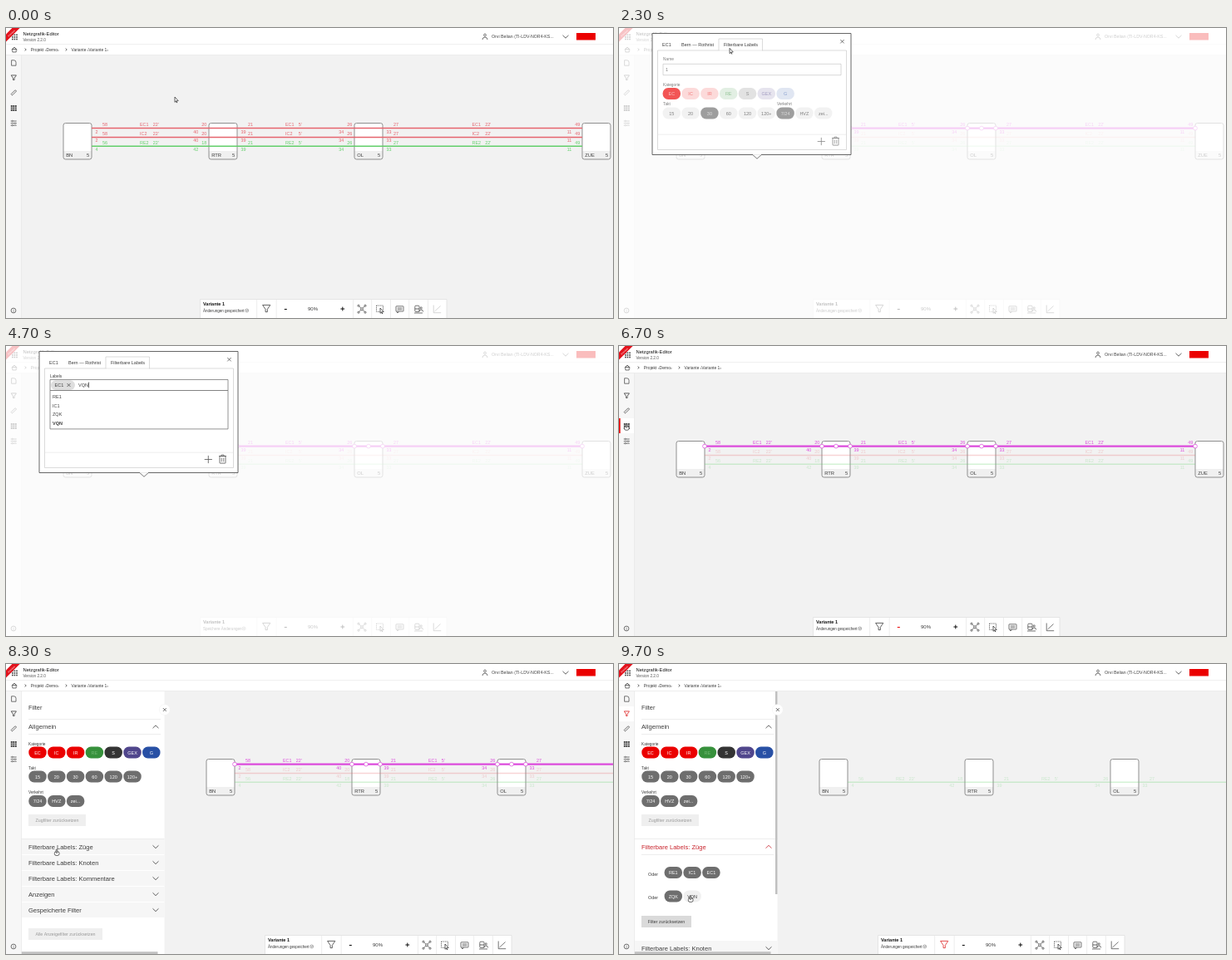
Animation, 730 px wide and 349 px high, one loop 9800 ms. Source, as an HTML page with a canvas:

```html
<!DOCTYPE html>
<html lang="de">
<head>
<meta charset="utf-8">
<title>Netzgrafik-Editor</title>
<style>
html, body { margin: 0; width: 100%; height: 100%; overflow: hidden; background: #f2f2f2; }
canvas { display: block; width: 730px; height: 349px; }
</style>
</head>
<body>
<canvas id="stage"></canvas>
<script>
const W = 730, H = 349, LOOP = 9800, STEP = 100;
const FONT = '"Liberation Sans", Arial, sans-serif';
const INK = '#3c3c3c', RED = '#eb0000', HOT = '#c8232c', PINK = '#dc4bdc', GRAY = '#6e6e6e', RULE = '#e2e2e2';
const cv = document.getElementById('stage');
const g = cv.getContext('2d');
const dpr = window.devicePixelRatio || 1;
cv.width = W * dpr;
cv.height = H * dpr;

const ramp = (t, a, b) => Math.min(1, Math.max(0, (t - a) / (b - a)));
const ease = p => p * p * (3 - 2 * p);
const within = (t, a, b) => t >= a && t < b;

// Moments of the story
const PICK = 900, OPEN = 1200, TAB = 2200, LIST = 3000, CHIP = 3600, TYPE = 4100,
  ENTER = 5000, CLOSE = 6250, PANEL = 7200, EXPAND = 8400, FILTER = 9500;

function text(s, x, y, size, color = INK, align = 'left', weight = '') {
  g.font = `${weight} ${size}px ${FONT}`;
  g.textAlign = align;
  g.fillStyle = color;
  g.fillText(s, x, y);
}
function rect(x, y, w, h, color) {
  g.fillStyle = color;
  g.fillRect(x, y, w, h);
}
function ink(fill, stroke, lw) {
  if (fill) { g.fillStyle = fill; g.fill(); }
  if (stroke) { g.strokeStyle = stroke; g.lineWidth = lw; g.stroke(); }
}
function box(x, y, w, h, r, fill, stroke, lw = 0.7) {
  g.beginPath();
  g.roundRect(x, y, w, h, r);
  ink(fill, stroke, lw);
}
function path(pts, color = INK, lw = 0.7, fill) {
  g.beginPath();
  pts.forEach(([x, y]) => g.lineTo(x, y));
  ink(fill, color, lw);
}
function line(x, y, dx, dy, color, lw) {
  path([[x, y], [x + dx, y + dy]], color, lw);
}
function ring(x, y, r, color = INK, lw = 0.7, fill) {
  g.beginPath();
  g.arc(x, y, r, 0, 7);
  ink(fill, color, lw);
}
function layer(alpha, draw, dx = 0, dy = 0, turn = 0) {
  if (alpha <= 0) return;
  g.save();
  g.globalAlpha *= alpha;
  g.translate(dx, dy);
  g.rotate(turn);
  draw();
  g.restore();
}

// Icons

function cross(x, y, r, color = INK) {
  line(x - r, y - r, 2 * r, 2 * r, color);
  line(x - r, y + r, 2 * r, -2 * r, color);
}
function plus(x, y, r, color = INK, lw = 0.8) {
  line(x - r, y, 2 * r, 0, color, lw);
  line(x, y - r, 0, 2 * r, color, lw);
}
function wedge(x, y, w, h, color = INK, fill) {
  path([[x - w, y - h / 2], [x, y + h / 2], [x + w, y - h / 2]], color, 0.8, fill);
}
const chevron = (x, y, up, color) => wedge(x, y, 3.5, up ? -3.4 : 3.4, color);
function funnel(x, y, s, color = INK) {
  const half = [[1, -1], [0.25, 0.1], [0.25, 0.8]];
  const mirror = half.map(([a, b]) => [-a, b]).reverse();
  path([...half, ...mirror, half[0]].map(([a, b]) => [x + a * s, y + b * s]), color, 0.8);
}
function dots(x, y, gap, size) {
  for (let i = 0; i < 9; i++) rect(x + i % 3 * gap, y + Math.floor(i / 3) * gap, size, size, INK);
}
function person(x, y, s) {
  ring(x, y - s, s * 0.7);
  g.beginPath();
  g.arc(x, y + s * 1.8, s * 1.5, Math.PI, 0);
  ink(null, INK, 0.7);
}
function arrow(x, y, s) {
  path([[0, 0], [0, 6.3], [1.7, 4.9], [4.2, 4.6], [0, 0]].map(([a, b]) => [x + a * s, y + b * s]), '#222', 0.7, '#fff');
  line(x + 1.7 * s, y + 4.9 * s, s, 2.2 * s, '#222', 1);
}
function hand(x, y) {
  box(x - 2.6, y + 2.8, 5.6, 4.6, 1.8, '#fff', '#222');
  box(x - 0.8, y, 1.6, 4.5, 0.8, '#fff', '#222');
}
function trash(x, y, color) {
  box(x - 3.5, y - 4, 7, 8.6, 0.5, null, color, 0.8);
  box(x - 1.5, y - 5.5, 3, 1.5, 0, null, color);
  line(x - 4.5, y - 4, 9, 0, color, 0.8);
  for (const d of [-1.2, 1.2]) line(x + d, y - 2, 0, 4.8, color);
}

// Controls

function pill(label, x, y, fill, color = '#fff') {
  box(x - 10.7, y - 7, 21.4, 14, 6.5, fill);
  text(label, x, y + 2, 5.5, color, 'center');
}
function pills(labels, x, y, style = () => [GRAY]) {
  labels.forEach((s, i) => pill(s, x + i * 22.8, y, ...style(s, i)));
}
function button(label, w, y, fill, color) {
  rect(27, y, w, 14, fill);
  text(label, 27 + w / 2, y + 9, 5.3, color, 'center');
}

// Network graph

const NODE = 34;
const nodes = [['BN', 69], ['RTR', 244], ['OL', 419], ['ZUE', 693]];
const legs = [[58, 22], [21, 5], [27, 22]];
const trains = ['EC1', 'IC2', 'RE2'];
const minute = n => n % 60;

function drawTrain(name, row, picked) {
  const y = 120.6 + row * 10.8, regional = name === 'RE2';
  const color = picked ? PINK : regional ? '#62cf6a' : '#e5646e';
  const label = (s, x, dy, align) => text(s, x, y + dy, 5.4, color, align);
  line(nodes[0][1] + NODE, y, 590, 0, color, picked ? 2.2 : 1.5);
  legs.forEach(([leave, time], i) => {
    const a = nodes[i][1] + NODE, b = nodes[i + 1][1], mid = (a + b) / 2;
    const dep = leave - (regional && !i ? 2 : 0), arr = minute(dep + time);
    label(dep, a + 13, -2.4);
    label(60 - dep, a + 4.5, 6);
    label(name, mid - 12.5, -2.4);
    label(time + "'", mid + 3.2, -2.4);
    label(arr, b - 2.8, -2.4, 'right');
    label(60 - arr, b - 12.7, 6, 'right');
  });
  if (!picked) return;
  nodes.forEach(([, x], i) => {
    const stops = i === 0 ? [NODE] : i === 3 ? [0] : [0, NODE / 2, NODE];
    stops.forEach(d => ring(x + d, y, 2.4, PINK, 0.7, '#fff'));
  });
}

function drawGraph(t) {
  const sel = t >= PICK, left = 1 - ramp(t, FILTER - 100, FILTER + 100);
  for (const [name, x] of nodes) {
    box(x, 114.5, NODE, 43.5, 2.5, '#fff');
    box(x, 148, NODE, 10, [0, 0, 2.5, 2.5], '#f0f0f0');
    box(x, 114.5, NODE, 43.5, 2.5, null, '#858585', 0.9);
    text(name, x + 3.2, 155.2, 5.8);
    text('5', x + 31, 155.2, 5.6, INK, 'right');
  }
  trains.forEach((name, row) => {
    const picked = sel && row === 0;
    const dim = sel && !picked ? 0.28 : 1;
    layer(dim * (row === 2 ? 1 : left), () => drawTrain(name, row, picked));
  });
}

// Application frame

function drawHeader() {
  rect(0, 0, W, 32.5, '#fff');
  rect(0, 19, W, 0.7, '#e8e8e8');
  rect(0, 32, W, 0.6, '#e4e4e4');
  dots(7, 7.5, 2.6, 1.6);
  line(-3, 15, 18, -18, '#e2121c', 6.5);
  layer(1, () => text('Preview', 0, 1, 3, '#fff', 'center'), 6.5, 6.5, -Math.PI / 4);
  text('Netzgrafik-Editor', 20.5, 9.3, 5.8, '#111');
  text('Version 2.2.0', 20.5, 16.3, 4.7, '#555');
  person(576, 10.5, 2);
  text('Orvi Belian (TI-LDV-NOR4-KS...', 584, 12.3, 5.25, '#444');
  chevron(673, 10.5);
  rect(686, 6, 23, 8.5, RED);
  wedge(10, 24.6, 3.3, -3.2);
  box(7.8, 25.5, 4.4, 3.5, 0, null, INK);
  for (const x of [23.5, 72.5]) layer(1, () => wedge(0, 0, 1.5, 1.4), x, 26, -Math.PI / 2);
  text('Projekt ‹Demo›', 29.8, 28, 5.05);
  text('Variante ‹Variante 1›', 78.5, 28, 4.9);
}

function drawSidebar(t) {
  const active = t >= FILTER;
  const over = within(t, 6600, 7000) ? 96 : within(t, 7000, 7600) ? 60 : 0;
  rect(0, 32.5, 18.5, H, '#f7f7f7');
  rect(18, 32.5, 0.6, H, '#e4e4e4');
  if (over || active) rect(0, (over || 60) - 9, 18, 18, '#fff');
  if (over) rect(0, over - 9, 1.6, 18, RED);
  box(6.6, 38.8, 5.4, 6.4, [0, 2.5, 0, 0], null, INK);
  funnel(9.3, 60, 3.1, active || over === 60 ? '#d22' : INK);
  layer(1, () => box(-3.6, -1, 7.2, 2, 0.5, null, INK), 9.3, 77.8, -Math.PI / 4);
  dots(5.8, 93, 2.5, 1.9);
  for (let i = 0; i < 3; i++) {
    line(5.7, 112 + i * 2.6, 7, 0);
    ring(i === 1 ? 11 : 7.7, 112 + i * 2.6, 0.8, INK, 0.5, '#fff');
  }
  ring(9, 340, 2.9);
  text('i', 9, 341.8, 4.8, INK, 'center');
}

function drawToolbar(t) {
  box(233.5, 326.5, 296.5, 30, 0, '#fff', '#ddd');
  rect(301.5, 327, 0.6, 22, RULE);
  rect(324.8, 327, 0.6, 22, RULE);
  for (let i = 0; i < 5; i++) rect(417 + i * 22.5, 327, 0.6, 22, RULE);
  const saving = within(t, CHIP, 6400), cx = saving ? 286 : 289.7;
  text('Variante 1', 237, 333.6, 5.5, '#111', 'left', 'bold');
  text(saving ? 'Speichere Änderungen' : 'Änderungen gespeichert', 237, 341.6, 4.55);
  ring(cx, 340, 2, '#666', 0.5);
  wedge(cx, 340, 0.9, 1.2, '#666');
  funnel(313.2, 338, 4.6, t >= FILTER ? '#d22' : INK);
  line(334.8, 338.5, 3, 0, within(t, 6500, 7000) ? RED : '#111', 1.1);
  text('90%', 369, 340, 6, INK, 'center');
  plus(404.8, 338, 2.4, '#111', 1);
  cross(428, 338.2, 3.9);
  for (const dx of [-4, 4]) for (const dy of [-4, 4]) ring(428 + dx, 338.2 + dy, 1.1, INK, 0.7, '#fff');
  ring(428, 338.2, 1.4, INK, 0.7, '#fff');
  g.setLineDash([1.4, 0.9]);
  box(445.5, 334, 8, 7.5, 0, null, INK);
  g.setLineDash([]);
  arrow(450, 337, 1);
  box(469, 334.8, 9, 6.2, 0.5, null, INK);
  wedge(471, 342, 1.2, 2, INK, '#fff');
  for (const y of [337, 338.9]) line(470.7, y, 5.7, 0);
  box(491.8, 334.2, 5.2, 7.2, 1, null, INK);
  rect(491.8, 337.6, 5.2, 0.8, INK);
  line(491, 343, 10, 0);
  person(499.2, 338.6, 1.6);
  const c = t >= PICK ? INK : '#c4c4c4';
  line(514.2, 333.5, 0, 9.2, c);
  line(514.2, 342.7, 9, 0, c);
  line(515.5, 341, 7, -6.5, c);
}

// Filter panel

const kinds = { EC: RED, IC: RED, IR: RED, RE: '#37913c', S: '#343434', GEX: '#50468c', G: '#2850a5' };
const beats = ['15', '20', '30', '60', '120', '120+'];
const runs = ['7/24', 'HVZ', 'zei...'];
const labels = ['RE1', 'IC1', 'EC1', 'ZQK', 'VQN'];
const more = ['Filterbare Labels: Knoten', 'Filterbare Labels: Kommentare', 'Anzeigen', 'Gespeicherte Filter'];

function sectionRow(label, y, open) {
  const color = open ? HOT : INK;
  rect(18.5, y - 9, 172, 18, open ? '#fff' : '#f6f6f6');
  text(label, 27, y + 2.6, 7.55, color);
  chevron(180, y, open, color);
}

function drawLabelFilter(h, off) {
  g.beginPath();
  g.rect(18, 229, 173, h);
  g.clip();
  rect(27, 229, 159, 0.6, RULE);
  for (const y of [251, 279.5]) text('Oder', 35, y + 3.5, 5.4);
  pills(labels.slice(0, 3), 65.3, 251);
  pills(labels.slice(3), 65.3, 279.5, s => s === 'VQN' && off ? ['#f0f0f0', INK] : [GRAY]);
  button('Filter zurücksetzen', 60, 303, '#dadada', INK);
}

function drawPanel(t) {
  const open = ease(ramp(t, EXPAND - 50, EXPAND + 300)), drop = 103 * open;
  rect(18.5, 32.5, 172, H, '#fff');
  text('Filter', 27, 55, 7.4);
  text('Allgemein', 27, 78.2, 7.6);
  chevron(180, 75.5, true);
  for (const y of [66, 84.2]) rect(27, y, 159, 0.6, RULE);
  ['Kategorie', 'Takt', 'Verkehrt'].forEach((s, i) => text(s, 27, 98 + i * 29.2, 4.8));
  pills(Object.keys(kinds), 38, 106.5, s => [kinds[s], s === 'RE' ? '#73ba75' : '#fff']);
  pills(beats, 38, 135.5);
  pills(runs, 38, 165);
  button('Zugfilter zurücksetzen', 69, 181, '#efefef', '#999');
  rect(18.5, 210, 172, 0.6, RULE);
  sectionRow('Filterbare Labels: Züge', 220, t >= EXPAND);
  layer(open ? 1 : 0, () => drawLabelFilter(drop, t >= FILTER));
  more.forEach((s, i) => sectionRow(s, 239 + i * 19 + drop));
  button('Alle Anzeigefilter zurücksetzen', 89, 318 + drop, '#efefef', '#999');
  rect(18.5, 346.2, 164, 2.8, '#c2c2c2');
  if (open) rect(188, 33, 2.5, 316 - 72 * open, '#c0c0c0');
  ring(190.8, 55, 6.5, '#eee', 0.5, '#fff');
  cross(190.8, 55, 2);
}

// Train dialog

function drawBaseTab() {
  text('Name', 53, 39.3, 4.8);
  box(53, 43.3, 214, 13.4, 0, '#fff', '#aaa');
  text('1', 56, 52, 5.5);
  text('Kategorie', 53, 69.6, 4.8);
  pills(Object.keys(kinds), 63.3, 79, (s, i) => i ? [kinds[s] + '38', kinds[s] + 'b0'] : [RED]);
  text('Takt', 53, 92.6, 4.8);
  text('Verkehrt', 190, 92.6, 4.8);
  pills([...beats, ...runs], 63.3, 102.5, s => s === '30' || s === '7/24' ? [GRAY] : ['#ececec', '#444']);
}

function chip(label, x) {
  box(x, 41.3, 29, 11.6, 5.8, '#dedede');
  text(label, x + 4.5, 49, 5.5);
  cross(x + 21.5, 47, 2);
}

function drawLabelTab(t) {
  const chips = t < CHIP ? [] : t < ENTER ? ['EC1'] : ['EC1', 'VQN'];
  const count = t < TYPE ? 0 : 1 + Math.floor((t - TYPE) / 300);
  const typed = t < ENTER ? 'VQN'.slice(0, count) : '';
  text('Labels', 53, 38.3, 4.8);
  if (within(t, LIST, ENTER)) {
    const list = labels.filter(s => !chips.includes(s));
    box(53, 53.5, 214, list.length * 10.6 + 4, 0, '#fff', '#666');
    list.forEach((s, i) => text(s, 56, 63 + i * 10.6, 5.5, INK, 'left', typed && s === 'VQN' ? 'bold' : ''));
  }
  box(53, 40.5, 214, 13, 0, '#fff', '#666');
  chips.forEach((s, i) => chip(s, 54 + i * 31));
  const x = 56 + chips.length * 31;
  text(typed, x, 49, 5.5);
  if (t >= LIST && (typed || t % 1000 < 500)) rect(x + g.measureText(typed).width + 0.5, 43.5, 0.6, 6.8, '#111');
}

function drawDialog(t) {
  const tabs = ['EC1', 'Bern — Rothrist', 'Filterbare Labels'], at = [52, 75, 126];
  const cur = t < TAB ? 0 : 2;
  box(40, 6.5, 239, 146, 0, '#fff', '#555', 0.9);
  wedge(166, 154.8, 5.5, 5, '#555', '#fff');
  rect(161, 151, 10, 1.5, '#fff');
  box(46.5, 27, 227, 119.5, 0, null, '#ccc');
  tabs.forEach((s, i) => {
    text(s, at[i], 22, 5.5);
    if (i !== cur) return;
    const w = g.measureText(s).width + 11.5;
    box(at[i] - 6, 13, w, 14, 0, null, '#ccc');
    rect(at[i] - 5.6, 26.4, w - 0.8, 1.2, '#fff');
  });
  cross(268.5, 16.2, 2.2);
  rect(47, 127.8, 226, 0.6, RULE);
  const faint = t < TAB + 200 ? '#888' : '#555';
  plus(243.3, 136.5, 4.6, faint);
  trash(260.5, 136.5, faint);
  layer(1 - ramp(t, TAB, TAB + 300), drawBaseTab);
  layer(ramp(t, TAB + 200, TAB + 400), () => drawLabelTab(t));
}

// Pointer stops: arrival time, x, y
const stops = [
  [0, 203, 83], [900, 163, 120], [2100, 135, 23], [2900, 100, 47], [3500, 62, 82],
  [6150, 268, 16], [6650, 9, 95], [7100, 9, 60], [8150, 61, 223], [9300, 86, 279]
];

function drawPointer(t) {
  if (within(t, CHIP + 100, 5700)) return;
  const next = stops.findIndex(s => s[0] > t);
  const b = stops.at(next), a = next > 0 ? stops[next - 1] : b;
  const p = ease(ramp(t, Math.max(a[0], b[0] - 700), b[0]));
  const x = a[1] + (b[1] - a[1]) * p, y = a[2] + (b[2] - a[2]) * p;
  if (within(t, 800, 1500) || within(t, 6600, 7500) || t >= 8100) hand(x, y);
  else arrow(x, y, 1);
}

function draw(t) {
  g.setTransform(dpr, 0, 0, dpr, 0, 0);
  rect(0, 0, W, H, '#f2f2f2');
  const slide = ease(ramp(t, PANEL, PANEL + 400));
  layer(1, () => drawGraph(t), 172 * slide);
  layer(1, () => drawToolbar(t), 78 * slide);
  if (slide) layer(1, () => drawPanel(t), -180 * (1 - slide));
  drawSidebar(t);
  drawHeader();
  const shown = ramp(t, OPEN, OPEN + 300) * (1 - ramp(t, CLOSE, CLOSE + 300));
  layer(shown * 0.74, () => rect(0, 0, W, H, '#fff'));
  layer(shown, () => drawDialog(t));
  drawPointer(t);
}

const start = performance.now();
function tick() {
  const t = (performance.now() - start) % LOOP;
  draw(Math.floor(t / STEP) * STEP);
  requestAnimationFrame(tick);
}
tick();
</script>
</body>
</html>
```
